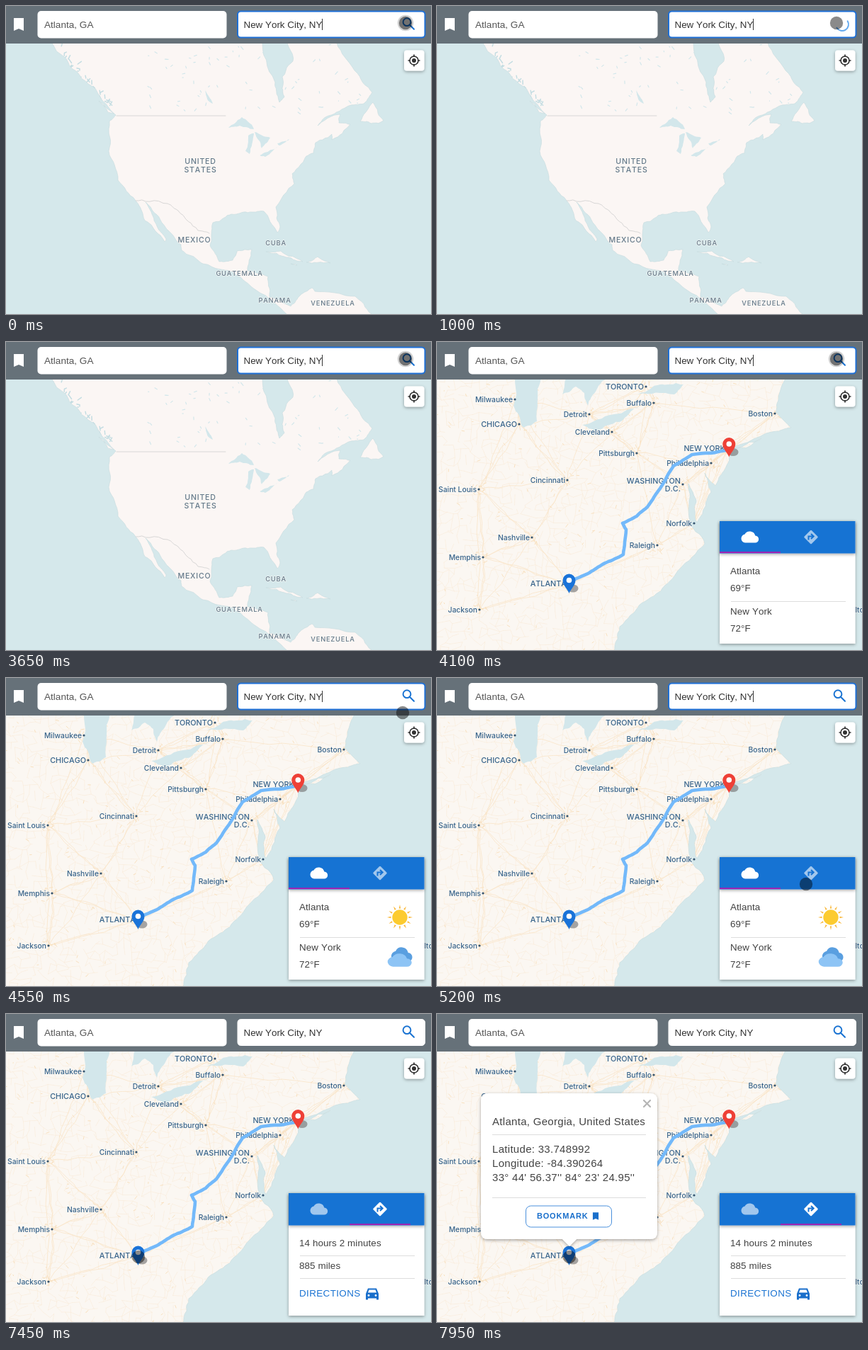
Animation, 600 px wide and 435 px high, one loop 8 s. Source, as an HTML page:

```html
<!DOCTYPE html>
<html lang="en">
<head>
<meta charset="utf-8">
<title>Route planner</title>
<style>
  html, body { margin: 0; width: 100%; height: 100%; overflow: hidden; }
  svg { display: block; width: 100%; height: 100%; font: 13.4px "Liberation Sans", Arial, sans-serif; font-kerning: none; }
  .label { font-family: Inter, "Open Sans", sans-serif; font-weight: 500; paint-order: stroke; stroke: #fbf8f4; stroke-opacity: .7; stroke-width: 1.4px; }
  .line { fill: none; stroke-linejoin: round; stroke-linecap: round; }
  .rule { stroke: #ddd; }
  .body { fill: #414141; letter-spacing: .1px; }
  .pop { fill: #444; font-size: 15px; letter-spacing: .3px; }
</style>
</head>
<body>
<svg viewBox="0 0 600 435" preserveAspectRatio="none">
  <defs>
    <filter id="shade" x="-20%" y="-20%" width="140%" height="150%">
      <feDropShadow dx="0" dy="1.5" stdDeviation="2" flood-color="#000" flood-opacity=".35"/>
    </filter>
    <clipPath id="wideClip"><path id="wideShape"/></clipPath>
    <clipPath id="nearClip"><path id="nearShape"/></clipPath>
    <path id="mark" d="M-7-9H7V9L0 6-7 9Z"/>
    <path id="cloud" d="M-7 8A6 6 0 0 1-7.500-3.900A8 8 0 0 1 7.300-2A5 5 0 0 1 7 8Z"/>
    <g id="pin">
      <path d="M0 0C-2-6-9-11-9-18.500A9 9 0 0 1 9-18.500C9-11 2-6 0 0Z"/>
      <circle cy="-18.500" r="3.800" fill="#fff"/>
    </g>
  </defs>
  <rect width="600" height="435" fill="#d5e8eb"/>
  <g id="wide"></g>
  <g id="near">
    <rect width="600" height="435" fill="#d5e8eb"/>
    <g id="nearMap"></g>
    <path id="route" class="line" stroke="#73b9fa" stroke-width="4.600"/>
    <g fill="#777" opacity=".65">
      <ellipse cx="418" cy="155.500" rx="7.500" ry="5.500"/>
      <ellipse cx="192" cy="348" rx="7.500" ry="5.500"/>
    </g>
    <use href="#pin" x="412.300" y="162.500" fill="#ee4036"/>
    <use href="#pin" x="186.500" y="355" fill="#1a73d8"/>
  </g>

  <g id="popup">
    <path filter="url(#shade)" fill="#fff" d="M72 112H301Q311 112 311 122V308Q311 318 301 318H197L187 328 177 318H72Q62 318 62 308V122Q62 112 72 112Z"/>
    <path class="line" d="M292 122L301 131M301 122L292 131" stroke="#b5b5b5" stroke-width="2.200"/>
    <text class="pop" x="78" y="157">Atlanta, Georgia, United States</text>
    <text class="pop" x="78" y="196">Latitude: 33.748992</text>
    <text class="pop" x="78" y="216">Longitude: -84.390264</text>
    <text class="pop" x="78" y="236">33° 44' 56.37'' 84° 23' 24.95''</text>
    <path class="rule" d="M78 170.500H295M78 259.500H295"/>
    <rect x="125.500" y="271" width="121" height="30" rx="7" fill="#fff" stroke="#4a90dc"/>
    <text x="141" y="289" fill="#1a6fcb" font-size="11" font-weight="700" letter-spacing=".8">BOOKMARK</text>
    <use href="#mark" transform="translate(224 285.500) scale(.58)" fill="#1a6fcb"/>
  </g>

  <rect width="600" height="53" fill="#667179"/>
  <use href="#mark" x="18" y="26" fill="#fff"/>
  <rect x="44.500" y="7" width="267" height="38.500" rx="5" fill="#fff"/>
  <text x="54" y="31" fill="#555" font-size="13.600">Atlanta, GA</text>
  <rect id="field" x="327" y="7.500" width="264.500" height="37" rx="4.500" fill="#fff"/>
  <text x="335.500" y="31" fill="#333">New York City, NY</text>
  <rect id="caret" x="446" y="18" width="1" height="16" fill="#333"/>
  <g id="glass" class="line" stroke="#1a73d2" stroke-width="2">
    <circle cx="566" cy="22.700" r="5.400"/><path d="M570 26.700L576 32.700"/>
  </g>
  <path id="spinner" class="line" d="M9 0A9 9 0 0 1-9 0" stroke="#64aaf0" stroke-width="2"/>

  <rect x="562" y="62.500" width="28.500" height="29" rx="4" fill="#fff" filter="url(#shade)"/>
  <g fill="none" stroke="#333" stroke-width="1.700" transform="translate(576 77)">
    <circle r="6"/>
    <path d="M0-8.500V-5M0 5V8.500M-8.500 0H-5M5 0H8.500"/>
    <circle r="3" fill="#333" stroke="none"/>
  </g>

  <g id="panel">
    <rect x="399" y="253" width="191.500" height="173" fill="#fff" filter="url(#shade)"/>
    <rect x="399" y="253" width="191.500" height="45.500" fill="#1873d3" filter="url(#shade)"/>
    <use id="cloudTab" href="#cloud" x="442" y="275.500" fill="#fff"/>
    <g id="turnTab" transform="translate(528 275.500)">
      <rect x="-7.300" y="-7.300" width="14.600" height="14.600" rx="1.500" transform="rotate(45)" fill="#fff"/>
      <path d="M-3.500 4V-1H3M0-4.500L3.700-1 0 2.500" fill="none" stroke="#1873d3" stroke-width="2"/>
    </g>
    <rect id="bar" y="296.200" width="86" height="1.900" fill="#a81db0"/>
    <g id="weather">
      <text class="body" x="414" y="328">Atlanta</text>
      <text class="body" x="414" y="352">69°F</text>
      <path class="rule" d="M415 366.500H577"/>
      <text class="body" x="414" y="384.500">New York</text>
      <text class="body" x="414" y="408.500">72°F</text>
      <g id="skies">
        <g id="sun" transform="translate(556 338)"></g>
        <use href="#cloud" transform="translate(559 390.500) scale(1.200 1.250)" fill="#5a9fe0"/>
        <use href="#cloud" transform="translate(556 398.500) scale(1.380 1.150)" fill="#8dc4f5"/>
      </g>
    </g>
    <g id="trip">
      <text class="body" x="414" y="328">14 hours 2 minutes</text>
      <text class="body" x="414" y="359.500">885 miles</text>
      <path class="rule" d="M415 341.500H577M415 373.500H577"/>
      <text x="414" y="399" fill="#1a73d2" letter-spacing=".4">DIRECTIONS</text>
      <path fill="#1a6fcb" d="M508 395L511 387.500H523L526 395V403.500H523V401.500H511V403.500H508Z"/>
      <path fill="#fff" d="M511 393.500L512.500 389.500H521.500L523 393.500Z"/>
      <circle cx="512" cy="397.500" r="1.400" fill="#fff"/><circle cx="522" cy="397.500" r="1.400" fill="#fff"/>
    </g>
  </g>
  <g id="cursor">
    <circle id="halo" r="11.300" opacity=".18"/>
    <circle r="9.200" opacity=".46"/>
  </g>
</svg>
<script>
const $ = id => document.getElementById(id);
const LOOP = 8000, WATER = '#d3e7eb';

let seed = 7;
const rand = () => (seed = (seed * 16807) % 2147483647) / 2147483647;
const jitter = a => (rand() - .5) * 2 * a;
const gap = (p, q) => Math.hypot(p[0] - q[0], p[1] - q[1]);
const points = s => s.trim().split(/\s+/).map(p => p.split(',').map(Number));
const toPath = pts => 'M' + pts.map(p => p.map(v => v.toFixed(1)).join(' ')).join('L');

// Midpoint displacement, scaled by segment length, gives a natural line.
function rough(pts, closed, amount = .1) {
  for (let n = 0; n < 3; n++) pts = pts.flatMap((p, i) => {
    const q = pts[i + 1] || (closed && pts[0]);
    if (!q) return [p];
    const a = Math.min(2.5, gap(p, q) * amount);
    return [p, [(p[0] + q[0]) / 2 + jitter(a), (p[1] + q[1]) / 2 + jitter(a)]];
  });
  return toPath(pts) + (closed ? 'Z' : '');
}
const shapes = list => list.map(s => rough(points(s), true)).join('');
const trail = (s, amount) => rough(points(s), false, amount);
const fill = (d, color, more = '') => `<path d="${d}" fill="${color}" ${more}/>`;
const stroke = (d, color, width) => `<path class="line" d="${d}" stroke="${color}" stroke-width="${width}"/>`;
const label = (s, x, y, size, space, anchor, color) =>
  `<text class="label" x="${x}" y="${y}" font-size="${size}" letter-spacing="${space}" text-anchor="${anchor}" fill="${color}">${s}</text>`;

// A short random dash near a place.
function dash(x, y, spread, length) {
  const p = [x + jitter(spread), y + jitter(spread)];
  return toPath([p, [p[0] + jitter(length), p[1] + jitter(length)]]);
}
const many = (n, make) => Array.from({ length: n }, (_, i) => make(i / n)).join('');

function buildWide() {
  const pacific = `60,44 88,80 116,110 147,146 155,154 146,163 145,205 158,246 183,275 196,303 224,333
    226,329 209,303 197,277 220,306 247,337 248,345 278,364 326,381 357,404 378,419 404,440`;
  const gulf = `520,440 493,410 436,403 432,398 412,412 402,424 372,411 370,382 341,374 347,344 326,346
    320,359 301,361 288,338 292,306 318,294 348,291 364,290 383,320 387,312 381,284`;
  const atlantic = `407,251 404,237 424,212 434,208 437,193 460,181 460,189 486,167 470,165 472,153 440,169
    451,157 480,143 505,138 517,122 492,91 461,44 397,44 405,78 390,100 393,128 386,136 380,108 358,44`;
  const land = rough([pacific, gulf, atlantic].flatMap(points), true);
  const isles = shapes(['500,163 518,136 533,162 516,166', '367,347 388,346 419,361 396,355',
    '424,362 440,354 458,363', '402,364 411,366', '131,134 152,152 144,150']);
  const lakes = shapes(['314,172 333,157 350,174 330,169', '342,183 350,180 344,209 338,205',
    '351,178 373,186 361,201', '358,211 384,198 366,213', '383,194 400,188 386,197', '281,116 292,138 284,131']);
  const ponds = many(70, () => dash(200 + rand() * 300, 54 + rand() * 98, 0, 4));
  const fjords = many(30, k => dash(76 + 76 * k, 60 + 86 * k, 4, 6));
  const borders = 'M156 155H310' + trail('183,275 228,279 243,289 271,317 287,321');

  $('wideShape').setAttribute('d', land);
  const ink = '#64798a';
  const name = (s, x, y, size = 10.6) => label(s, x, y, size, .8, 'middle', ink);
  $('wide').innerHTML = fill(land + isles, '#fbf6f4', 'stroke="#c5dadd" stroke-width=".6"') +
    '<g clip-path="url(#wideClip)">' + fill(lakes, WATER) + stroke(ponds, WATER, 1.2) +
    stroke(fjords, '#c4dde2', 1.5) + stroke(borders, '#cfcfcf', .8) + '</g>' +
    name('UNITED', 274.5, 223) + name('STATES', 274.5, 234.5) + name('MEXICO', 266, 334) +
    name('CUBA', 381, 338, 9.3) + name('GUATEMALA', 329.5, 381, 9.3) +
    name('PANAMA', 379.5, 419, 9.3) + name('VENEZUELA', 461.5, 423, 9.3);
}

function buildNear() {
  const coast = `-9,40 497,40 482,82 478,99 491,112 500,121 480,126 414,149 410,172 393,203 378,185 387,212
    367,255 366,225 355,200 356,248 378,285 340,323 318,348 290,368 258,402 249,440 -9,440`;
  const land = rough(points(coast), true) + shapes(['414,153 440,142 458,136 438,149']);
  const lakes = shapes(['110,44 108,90 122,121 141,112 142,80 149,44', '184,44 177,74 196,63 208,72 213,90 224,70 246,44',
    '205,117 250,102 286,91 260,112 222,125', '283,74 315,60 348,60 335,74']);
  const cities = [
    ['TORONTO', 295, 63], ['Milwaukee', 110, 81], ['Buffalo', 306, 86], ['Detroit', 215, 102],
    ['CHICAGO', 116, 116], ['Boston', 477, 101], ['Cleveland', 247, 127], ['NEW YORK', 410, 150],
    ['Pittsburgh', 282, 157], ['Philadelphia', 387, 171], ['Cincinnati', 184, 195], ['WASHINGTON', 347, 201],
    ['Saint Louis', 59, 208], ['Norfolk', 363, 256], ['Nashville', 134, 276], ['Raleigh', 311, 287],
    ['Memphis', 65, 304], ['ATLANTA', 186, 341], ['Jackson', 60, 378]
  ].map(([name, x, y]) => ({ name, at: [x, y] }));

  // Jittered grid of back roads; main roads join each city to its nearest neighbours.
  const step = 9, cols = 62, nodes = [];
  for (let i = 0; i < cols * 46; i++)
    nodes.push([(i % cols + rand()) * step - 9, 42 + (Math.floor(i / cols) + rand()) * step]);
  const mesh = nodes.map((p, i) => [i + 1, i + cols]
    .filter(j => nodes[j] && gap(p, nodes[j]) < 20 && rand() < .55)
    .map(j => toPath([p, nodes[j]])).join('')).join('');
  const highways = cities.map(a => [...cities].sort((b, c) => gap(a.at, b.at) - gap(a.at, c.at))
    .slice(1, 5).map(b => rough([a.at, b.at], false)).join('')).join('');
  const suburbs = cities.map(c => many(12, () => dash(...c.at, 9, 5))).join('') +
    many(190, () => dash(rand() * 480, 53 + rand() * 380, 0, 4));

  const ink = '#37638a';
  const town = ({ name, at: [x, y] }) => `<circle cx="${x}" cy="${y}" r="1.600" fill="#35546f"/>` +
    label(name, x - 3, y + (name === 'WASHINGTON' ? -1 : 4), name === name.toUpperCase() ? 10.8 : 10.3, 0, 'end', ink);
  $('nearShape').setAttribute('d', land);
  $('nearMap').innerHTML = fill(land, '#fbf7f2', 'stroke="#c8dde0" stroke-width=".7"') +
    '<g clip-path="url(#nearClip)">' + stroke(mesh, '#faeddd', .7) + stroke(highways, '#fae7cd', .9) +
    stroke(suburbs, '#f8e0bf', 1) + fill(lakes, WATER) + '</g>' + cities.map(town).join('') +
    label('D.C.', 344, 211, 10.8, 0, 'end', ink) + label('lton', 590.5, 382, 10.3, 0, 'start', ink);
  $('route').setAttribute('d', trail(`186,339 215,326 240,311 263,300 267,265 262,256 282,246 297,233
    318,202 334,175 360,159 412,152`, .03));
}

function buildSun() {
  const ray = k => `<path d="M-1.200-12.500L0-18 1.200-12.500Z" transform="rotate(${k * 360})" fill="#f9b93c"/>`;
  $('sun').innerHTML = many(12, ray) + '<circle r="10.700" fill="#fccb2f"/>';
}

const ease = v => v * v * (3 - 2 * v);
const phase = (t, start, length) => Math.max(0, Math.min(1, (t - start) / length));
const set = (id, name, value) => $(id).setAttribute(name, value);
const show = (id, on) => $(id).style.display = on ? '' : 'none';

const AT = { spin: 350, found: 3550, map: 3850, skies: 4300, leave: 4400, tab: 5650, popup: 7650 };
// Pointer stops: time, x, y
const STOPS = [[0, 564, 24], [AT.leave, 564, 24], [5200, 521, 291], [5450, 527, 280], [6050, 527, 280],
  [6450, 472, 284], [7200, 187, 343], [LOOP, 187, 343]];

function pointer(t) {
  const i = STOPS.findIndex(s => s[0] > t), [a, b] = [STOPS[i - 1], STOPS[i]];
  const k = ease(phase(t, a[0], b[0] - a[0]));
  return [a[1] + (b[1] - a[1]) * k, a[2] + (b[2] - a[2]) * k];
}

function draw(t) {
  const busy = t >= AT.spin && t < AT.found, onTrip = t >= AT.tab;
  show('glass', !busy);
  show('spinner', busy);
  set('spinner', 'transform', `translate(572 26) rotate(${-135 + (t - 2000) * 360 / 1400})`);

  set('near', 'opacity', phase(t, AT.map, 150));
  show('panel', t >= AT.map);
  show('weather', !onTrip);
  show('trip', onTrip);
  show('skies', t >= AT.skies);
  set('bar', 'x', 399 + 86 * ease(phase(t, AT.tab, 300)));
  set('cloudTab', 'opacity', onTrip ? .6 : 1);
  set('turnTab', 'opacity', onTrip ? 1 : .6);

  show('caret', !onTrip);
  set('field', 'stroke', onTrip ? '#fff' : '#1f70d6');
  set('field', 'stroke-width', onTrip ? 1 : 2);

  set('popup', 'opacity', phase(t, AT.popup, 200));
  set('cursor', 'transform', `translate(${pointer(t).join(' ')})`);
  show('halo', t < AT.leave && !busy);
}

buildWide();
buildNear();
buildSun();
const began = performance.now();
(function tick() {
  draw((performance.now() - began) % LOOP);
  requestAnimationFrame(tick);
})();
</script>
</body>
</html>
```
